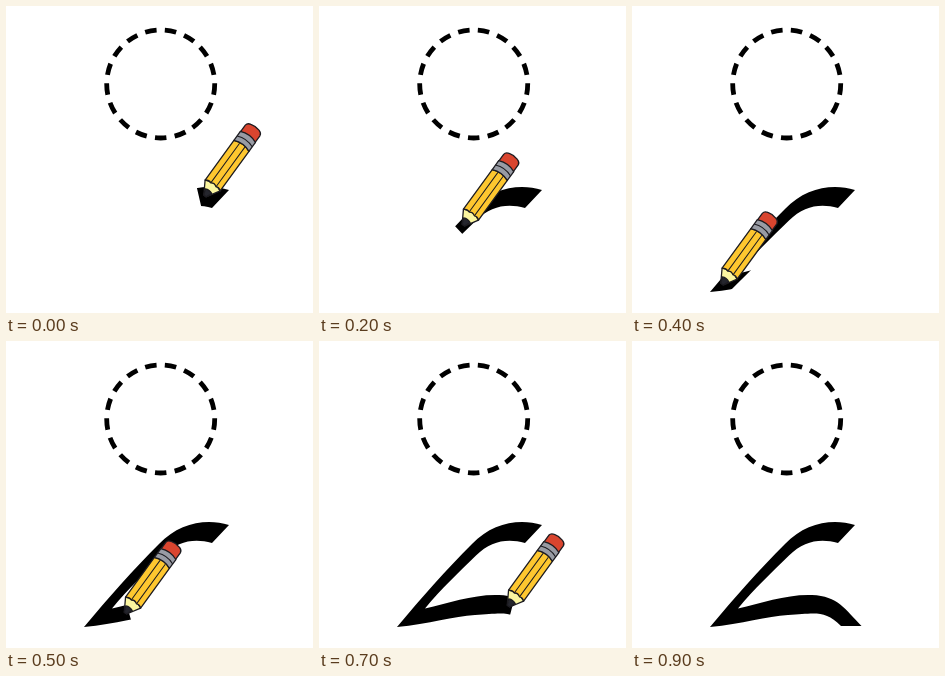
Write an HTML page without scripts that moves like this. It is 307 by 307 pixels and loops after 2.9 s.

```html
<!DOCTYPE html>
<html lang="en">
<head>
<meta charset="utf-8">
<title>Pencil stroke</title>
<style>
@property --k { syntax: "<number>"; inherits: true; initial-value: 0; }

html, body { margin: 0; width: 100%; height: 100%; overflow: hidden; background: #fff; }

/* --k counts nine steps of 100 ms, then the finished stroke rests */
svg {
  display: block; width: 307px; height: 307px;
  animation: count 2.9s infinite;
}
@keyframes count {
  0% { --k: 0; animation-timing-function: steps(9, end); }
  31.0345%, 100% { --k: 9; }
}

/* the first leg gathers speed for four steps, the second is even */
svg * {
  --j: min(var(--k), 4);
  --down: calc(27 * var(--j) + 2.2 * var(--j) * var(--j));
  --back: max(0, 35.5 * (var(--k) - 4));
}
.leg { fill: none; stroke: #fff; stroke-dasharray: 400px; }
.first { stroke-width: 24px; stroke-dashoffset: calc(363px - 1px * var(--down)); }
.second { stroke-width: 30px; stroke-dashoffset: calc(400px - 1px * max(0, 35.5 * var(--k) - 124)); }

.pencil {
  offset-path: path("M199 190C181 193 161 203 145 218.5C125 238 108 257 88 280.5L118 272.5C142 266 168 260 189 265C205 269 215 277 228 287");
  offset-distance: calc(1px * (var(--down) + var(--back)));
  offset-rotate: 36deg;
  opacity: calc(9 - var(--k));
  stroke: #1c1b20; stroke-width: 1.3px; stroke-linejoin: round;
}
.pencil .line { fill: none; stroke-width: 1px; }
</style>
</head>
<body>
<svg viewBox="0 0 307 307">
  <mask id="drawn" maskUnits="userSpaceOnUse" x="0" y="0" width="307" height="307">
    <path class="leg first" d="M230 192C200 186 178 194 158 210C130 236 108 258 70 296"/>
    <path class="leg second" d="M72 288C110 277 140 267 165 264C195 262 208 268 232 292"/>
  </mask>

  <circle cx="154.7" cy="78" r="54" fill="none" stroke="#000" stroke-width="4.8"
    pathLength="17" stroke-dasharray=".58 .42" stroke-dashoffset=".29" transform="rotate(90 154.7 78)"/>

  <path mask="url(#drawn)" d="M223 184C200 177 173 182 153 203C127 229 103 256 78 286C110 283 135 275 156 274C182 273 192 268 209 285H229.500C213 268 206 255 180 254C155 253 130 262 106 267.500C122 248 140 231 157 214.500C172 200 188 197 206 202Z"/>

  <g class="pencil">
    <path d="M-9.300 -13Q0 -18 9.300 -13L1.500 0H-1.500Z" fill="#fbf6a0"/>
    <path d="M-4 -6Q0 -8 4 -6L1.500 0H-1.500Z" fill="#25262d"/>
    <path d="M-9.300 -13V-62Q0 -66 9.300 -62V-13Q6 -15.500 3.500 -14Q0 -16.500 -3 -14Q-6 -15.500 -9.300 -13Z" fill="#fec72f"/>
    <path class="line" d="M-3 -14V-63M3.500 -14V-63"/>
    <path d="M-9 -72V-81Q-8.700 -84 -5 -85Q0 -86.500 5 -85Q8.700 -84 9 -81V-72Z" fill="#d9452f"/>
    <path d="M-9.300 -62V-73Q0 -77 9.300 -73V-62Q0 -66 -9.300 -62Z" fill="#989ba4"/>
    <path class="line" d="M-9.300 -67.500Q0 -71.500 9.300 -67.500"/>
  </g>
</svg>
</body>
</html>
```
